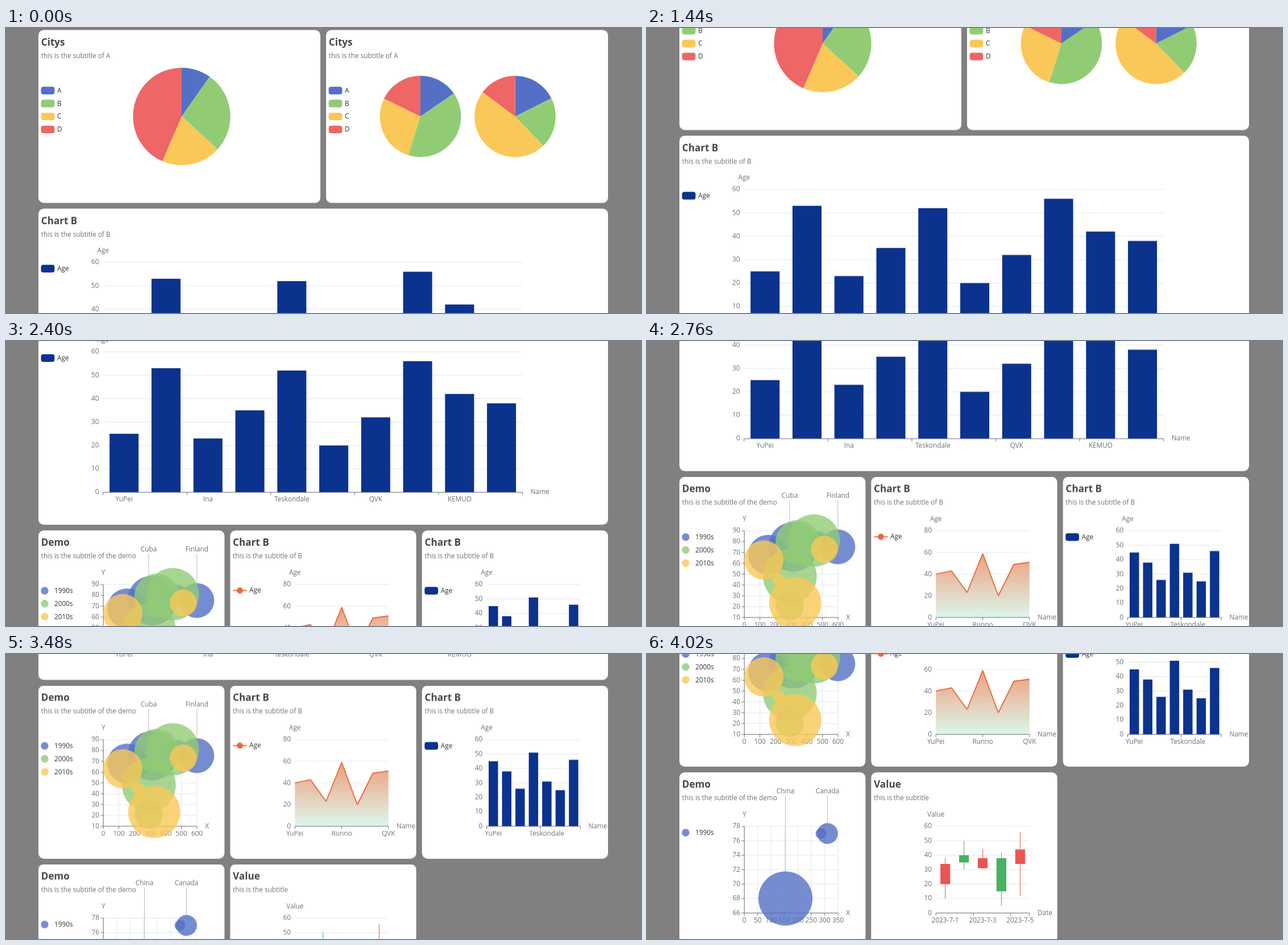
These frames come from a looping animation (1117 by 501 pixels, 5760 ms). An HTML page:

```html
<!DOCTYPE html>
<html lang="en">
<head>
<meta charset="utf-8">
<title>Dashboard scroll</title>
<style>
  html, body { margin: 0; width: 100%; height: 100%; overflow: hidden; background: #808080; }
  svg { display: block; width: 1117px; height: 501px; }
  text { font: 11.8px "Open Sans", "Noto Sans", sans-serif; fill: #6e7079; }
  .title { font-size: 17.1px; font-weight: 700; fill: #464646; }
  .legend { fill: #333; }
  .grid { stroke: #e0e6f1; }
  .axis { stroke: #6e7079; }
  .leader { stroke: #bbb; }
  #page { animation: scroll 5760ms infinite; }
  /* The page moves once every 60 ms. */
  @keyframes scroll {
    0%      { transform: translateY(0); animation-timing-function: step-end; }
    17.708% { transform: translateY(-5.5px); animation-timing-function: steps(14); }
    32.291% { transform: translateY(-251px); animation-timing-function: steps(9); }
    41.666% { transform: translateY(-393px); animation-timing-function: steps(11); }
    53.125% { transform: translateY(-566px); animation-timing-function: steps(7); }
    60.416% { transform: translateY(-670.5px); animation-timing-function: steps(9); }
    69.791%, 100% { transform: translateY(-832px); }
  }
</style>
</head>
<body>
<svg viewBox="0 0 1117 501">
  <defs>
    <linearGradient id="area" x1="0" y1="0" x2="0" y2="1">
      <stop offset="0" stop-color="#ee9873"/>
      <stop offset="1" stop-color="#d8f6ea"/>
    </linearGradient>
  </defs>
  <g id="page"></g>
</svg>
<script>
const BLUE = '#5470c6', GREEN = '#91cc75', YELLOW = '#fac858', RED = '#ee6666';
const NAVY = '#0b328d', ORANGE = '#e8683c', UP = '#eb5454', DOWN = '#47b262';
const PALETTE = [BLUE, GREEN, YELLOW, RED];
const LEGEND_GAP = 22.8;

// Text is placed by the middle of its capitals.
const text = (x, y, label, anchor = 'start', cls = '') =>
  `<text x="${x}" y="${y}" dy=".36em" text-anchor="${anchor}" class="${cls}">${label}</text>`;
const line = (x1, y1, x2, y2, cls) =>
  `<line x1="${x1}" y1="${y1}" x2="${x2}" y2="${y2}" class="${cls}"/>`;
const rect = (x, y, w, h, fill, r = 0) =>
  `<rect x="${x}" y="${y}" width="${w}" height="${h}" rx="${r}" fill="${fill}"/>`;
const circle = (x, y, r, fill, opacity = 1) =>
  `<circle cx="${x}" cy="${y}" r="${r}" fill="${fill}" opacity="${opacity}"/>`;
const each = (list, draw) => list.map(draw).join('');
const range = (from, to, step) =>
  Array.from({ length: Math.round((to - from) / step) + 1 }, (_, i) => from + i * step);

// Contents of a card use stage x and y measured from the top of the card.
function card(x, top, width, height, title, subtitle, content) {
  return `<g transform="translate(0 ${top})">` +
    rect(x, 0, width, height, '#fff', 9.5) +
    text(x + 4.8, 21, title, 'start', 'title') +
    text(x + 4.8, 45.2, subtitle) + content + '</g>';
}

const legendBox = (x, y, label, fill) =>
  rect(x, y - 6.7, 23.8, 13.4, fill, 4) + text(x + 28.5, y - .5, label, 'start', 'legend');

const legendDot = (x, y, label, fill) =>
  circle(x, y, 6.7, fill, .8) + text(x + 17, y - .3, label, 'start', 'legend');

const cityLegend = x => each(['A', 'B', 'C', 'D'], (label, i) =>
  legendBox(x, 106.5 + i * LEGEND_GAP, label, PALETTE[i]));

function pie(cx, r, ends) {
  const cy = 152;
  const point = deg => {
    const a = deg * Math.PI / 180;
    return `${cx + r * Math.sin(a)} ${cy - r * Math.cos(a)}`;
  };
  return each([...ends, 360], (end, i) => {
    const start = i ? ends[i - 1] : 0;
    return `<path d="M${cx} ${cy}L${point(start)}A${r} ${r} 0 ${+(end - start > 180)} 1 ${point(end)}Z" fill="${PALETTE[i]}"/>`;
  });
}

// Value axis with horizontal rules; returns the drawing and the value-to-y scale.
function valueAxis({ x0, x1, top = 95, base = 247.3, min = 0, max, step, name }) {
  const y = v => base - (v - min) / (max - min) * (base - top);
  const svg = each(range(min, max, step), v =>
    line(x0, y(v), x1, y(v), 'grid') + text(x0 - 7.3, y(v) - .8, v, 'end')) +
    text(x0, top - 21.2, name, 'middle');
  return { svg, y };
}

const baseline = (x0, x1, base, ticks, name) =>
  line(x0, base, x1, base, 'axis') +
  each(ticks, x => line(x, base, x, base + 4.8, 'axis')) +
  text(x1 + 14.2, base - .8, name);

function barChart({ x0, x1, base = 247.3, values, labels, every, barRatio, ...rest }) {
  const { svg, y } = valueAxis({ x0, x1, base, name: 'Age', ...rest });
  const band = (x1 - x0) / values.length, w = band * barRatio;
  const center = i => x0 + (i + .5) * band;
  const ticks = [...labels.map((_, i) => x0 + i * every * band), x1];
  return svg +
    each(values, (v, i) => rect(center(i) - w / 2, y(v), w, base - y(v), NAVY)) +
    baseline(x0, x1, base, ticks, 'Name') +
    each(labels, (label, i) => text(center(i * every), base + 12, label, 'middle'));
}

function bubbleChart({ min, max, step, xMax, xStep, series, leaders }) {
  const x0 = 171.2, x1 = 336, base = 247.3;
  const { svg, y } = valueAxis({ x0, x1, min, max, step, name: 'Y' });
  const x = v => x0 + v / xMax * (x1 - x0);
  const stops = range(0, xMax, xStep);
  return each(stops, v => line(x(v), 95, x(v), base, 'grid')) + svg +
    each(range(min, max, step), v => line(x0 - 4.8, y(v), x0, y(v), 'axis')) +
    line(x0, 95, x0, base, 'axis') +
    baseline(x0, x1, base, stops.map(x), 'X') +
    each(stops, v => text(x(v), base + 12, v, 'middle')) +
    each(leaders, ([label, lx, end]) =>
      line(lx, 41, lx, end, 'leader') + text(lx, 32.7, label, 'middle')) +
    each(series, (dots, i) => each(dots, ([cx, cy, r]) => circle(cx, cy, r, PALETTE[i], .8))) +
    each(series, (_, i) => legendDot(68, 106 + i * LEGEND_GAP, `${1990 + i * 10}s`, PALETTE[i]));
}

function areaChart(values, labels) {
  const x0 = 508.2, x1 = 672.8, base = 247.3;
  const { svg, y } = valueAxis({ x0, x1, max: 80, step: 20, name: 'Age' });
  const gap = (x1 - x0) / (values.length - 1);
  const points = values.map((v, i) => `${x0 + i * gap},${y(v)}`).join(' ');
  const ticks = labels.map((_, i) => x0 + i * 3 * gap);
  return svg +
    `<polygon points="${x0},${base} ${points} ${x1},${base}" fill="url(#area)" opacity=".93"/>` +
    baseline(x0, x1, base, ticks, 'Name') +
    `<polyline points="${points}" fill="none" stroke="${ORANGE}" stroke-width="1.9" stroke-linejoin="bevel"/>` +
    each(labels, (label, i) => text(ticks[i], base + 12, label, 'middle')) +
    rect(399.2, 104.6, 24.5, 1.9, ORANGE) + circle(411.4, 105.5, 5.4, ORANGE) +
    text(428, 104.7, 'Age', 'start', 'legend');
}

// Each candle: open, close, low, high.
function candleChart(candles) {
  const x0 = 508.2, x1 = 672.8, base = 247.3, band = (x1 - x0) / candles.length;
  const { svg, y } = valueAxis({ x0, x1, max: 60, step: 10, name: 'Value' });
  const center = i => x0 + (i + .5) * band;
  return svg +
    baseline(x0, x1, base, [x0, x0 + 2 * band, x0 + 4 * band, x1], 'Date') +
    each([0, 2, 4], i => text(center(i), base + 12, `2023-7-${i + 1}`, 'middle')) +
    each(candles, ([open, close, low, high], i) => {
      const color = close > open ? UP : DOWN, cx = center(i);
      return rect(cx - .5, y(high), 1, y(low) - y(high), color) +
        rect(cx - 8.6, y(Math.max(open, close)), 17.2, Math.abs(y(open) - y(close)), color);
    });
}

const COL = [57, 394.3, 731.7], THIRD = 327.3, HALF = 496, ROW = 304;

document.getElementById('page').innerHTML = [
  card(57, 3.5, HALF, ROW, 'Citys', 'this is the subtitle of A',
    cityLegend(61.6) + pie(309, 85.6, [35.2, 132.4, 203.4])),
  card(563, 3.5, HALF, ROW, 'Citys', 'this is the subtitle of A',
    cityLegend(567.6) + pie(729, 71.4, [55.5, 197.5, 296.2]) + pie(895.5, 71.4, [63.3, 136.1, 306.9])),

  card(57, 317.5, 1002, 398.5, 'Chart B', 'this is the subtitle of B',
    barChart({
      x0: 170.8, x1: 908.5, top: 94.5, base: 341.5, max: 60, step: 10, barRatio: .692,
      values: [25, 53, 23, 35, 52, 20, 32, 56, 42, 38],
      labels: ['YuPei', 'Ina', 'Teskondale', 'QVK', 'KEMUO'], every: 2
    }) + legendBox(61.6, 105.5, 'Age', NAVY)),

  card(COL[0], 726, THIRD, ROW, 'Demo', 'this is the subtitle of the demo',
    bubbleChart({
      min: 10, max: 90, step: 10, xMax: 600, xStep: 100,
      leaders: [['Cuba', 251, 82], ['Finland', 335.8, 93]],
      series: [
        [[213, 137, 35], [257, 123.3, 43.5], [302, 115, 19], [335.8, 123.2, 30.5]],
        [[265, 115, 39], [251.3, 175, 47.3], [293.5, 112, 46], [251.3, 227, 25]],
        [[205.5, 146.3, 34.5], [312, 127.3, 23.7], [232, 181, 11], [260.7, 222.2, 45.8]]
      ]
    })),
  card(COL[1], 726, THIRD, ROW, 'Chart B', 'this is the subtitle of B',
    areaChart([40, 43, 23, 59, 20, 49, 51], ['YuPei', 'Runno', 'QVK'])),
  card(COL[2], 726, THIRD, ROW, 'Chart B', 'this is the subtitle of B',
    barChart({
      x0: 845.5, x1: 1010.2, top: 95, max: 60, step: 10, barRatio: .7,
      values: [45, 38, 26, 51, 31, 25, 46], labels: ['YuPei', 'Teskondale'], every: 4
    }) + legendBox(736.3, 106, 'Age', NAVY)),

  card(COL[0], 1040, THIRD, ROW, 'Demo', 'this is the subtitle of the demo',
    bubbleChart({
      min: 66, max: 78, step: 2, xMax: 350, xStep: 50,
      leaders: [['China', 243.5, 174], ['Canada', 317.5, 89]],
      series: [[[243.5, 221.8, 47.6], [306, 107.6, 9.5], [317.5, 107.6, 18.3]]]
    })),
  card(COL[1], 1040, THIRD, ROW, 'Value', 'this is the subtitle',
    candleChart([[20, 34, 10, 38], [40, 35, 30, 50], [31, 38, 31, 44], [38, 15, 5, 42], [34, 44, 12, 56]]))
].join('');
</script>
</body>
</html>
```
